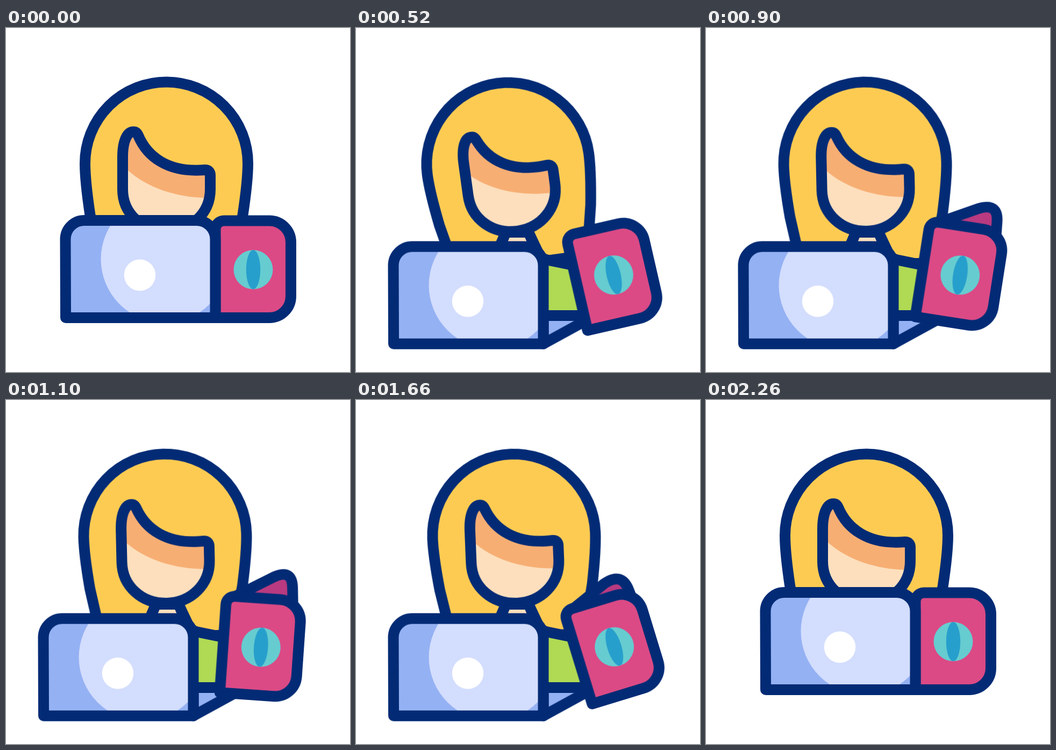
An HTML page for the animation above (2400 ms loop, 640 by 640 pixels).

```html
<!DOCTYPE html>
<html lang="en">
<head>
<meta charset="utf-8">
<title>Traveller at a laptop</title>
<style>
  html, body { margin: 0; width: 100%; height: 100%; overflow: hidden; background: #fff; }
  svg { display: block; width: 100vw; height: 100vh; }

  .line { stroke: #032b75; stroke-width: 20; stroke-linejoin: round; stroke-linecap: round; }
  .none { fill: none; }
  .hair { fill: #fecb52; }
  .skin { fill: #fddfbd; }
  .shade { fill: #f7ae73; }
  .shirt { fill: #b0da53; }
  .blue { fill: #94b1f3; }
  .pale { fill: #d3ddfd; }
  .pink { fill: #db4a85; }
  .plum { fill: #b93a80; }

  .head, .lid, .pass, .swing, .cover {
    animation: 2400ms cubic-bezier(.37, 0, .63, 1) infinite;
  }
  .head { animation-name: nod; transform-origin: 298.5px 367px; }
  .lid { animation-name: lid; }
  .pass { animation-name: pass; }
  .swing { animation-name: swing; transform-origin: 460px 432px; }
  .cover { animation-name: cover; }

  @keyframes nod {
    0%, 8.333%, 41.667%, 75%, 100% { transform: rotate(0deg); }
    25%, 58.333% { transform: rotate(-8.6deg); }
  }
  @keyframes lid {
    0%, 8.333%, 94.167%, 100% { transform: translate(0, 0); }
    16.667%, 85.833% { transform: translate(-41px, 48.6px); }
  }
  @keyframes pass {
    0%, 8.333%, 94.167%, 100% { transform: translate(0, 0); }
    16.667%, 85.833% { transform: translate(15.5px, 10.5px); }
  }
  @keyframes swing {
    0%, 16.667%, 85.833%, 100% { transform: rotate(0deg); }
    24.167%, 59.583%, 77.5% { transform: rotate(-17deg); }
    39.583% { transform: rotate(10deg); }
  }
  @keyframes cover {
    0%, 24.167%, 79.167%, 100% {
      d: path("M390 539 L396 364 L478 361 Q526 361 528 401 L528 482 Z");
    }
    40.833%, 62.917% {
      d: path("M390 539 L396 364 L474 318 Q508 299 511 335 L524 482 Z");
    }
  }
</style>
</head>
<body>
<svg viewBox="0 0 640 640">
  <defs>
    <path id="lidShape" d="M111 539 L110.5 393 A35 35 0 0 1 145.5 358 H354.5 A35 35 0 0 1 389.5 393 V539 Z"/>
    <path id="faceShape" d="M217 300 V240 C217 222 220 207 227 198 Q231 193 237 193 Q243 193 246 200
      C262 238 300 270 370 264 Q380 264 380 274 V300 C380 345 344 378 298.5 378 C253 378 217 345 217 300 Z"/>
    <clipPath id="lidClip"><use href="#lidShape"/></clipPath>
    <clipPath id="faceClip"><use href="#faceShape"/></clipPath>
  </defs>

  <g class="head">
    <path class="hair line" d="M176 440 L166 394 L156.5 348 C152 318 147 282 147 252
      A151.5 151.5 0 0 1 450 252 C450 282 445 318 440.5 348 L431 394 L421 440 Z"/>
  </g>

  <!-- laptop base, then the body in front of it -->
  <g class="lid">
    <path class="blue line" d="M389.5 539 L479 490 V470 H389.5 Z"/>
  </g>
  <path class="shirt line" d="M180 535 V460 Q190 442 244 432 Q256 429 261 422 L279 380 H321 L339 418
    Q344 429 356 431.500 L410 442.500 Q440 450 440 480 V535 Z"/>
  <path class="skin line" d="M279 380 L261 422 H339 L321 380 Z"/>

  <g class="head">
    <use href="#faceShape" class="skin"/>
    <path class="shade" clip-path="url(#faceClip)" d="M210 246 L227 265 C262 297 318 315 370 316 H390 V180 H210 Z"/>
    <use href="#faceShape" class="none line"/>
  </g>

  <g class="pass">
    <g class="swing">
      <path class="cover plum line" d="M390 539 L396 364 L478 361 Q526 361 528 401 L528 482 Z"/>
      <path class="pink line" d="M389.500 539 V374.500 A16 16 0 0 1 405.500 358.500 H490
        A40 40 0 0 1 530 398.500 V499 A40 40 0 0 1 490 539 Z"/>
      <circle cx="460" cy="449.500" r="36.500" fill="#66ccd0"/>
      <ellipse cx="460" cy="449.500" rx="13.200" ry="36.500" fill="#279fcc"/>
    </g>
  </g>

  <g class="lid">
    <use href="#lidShape" class="blue"/>
    <circle class="pale" clip-path="url(#lidClip)" cx="295" cy="430" r="118.500"/>
    <use href="#lidShape" class="none line"/>
    <circle cx="249" cy="459.700" r="29.300" fill="#fff"/>
  </g>
</svg>
</body>
</html>
```
